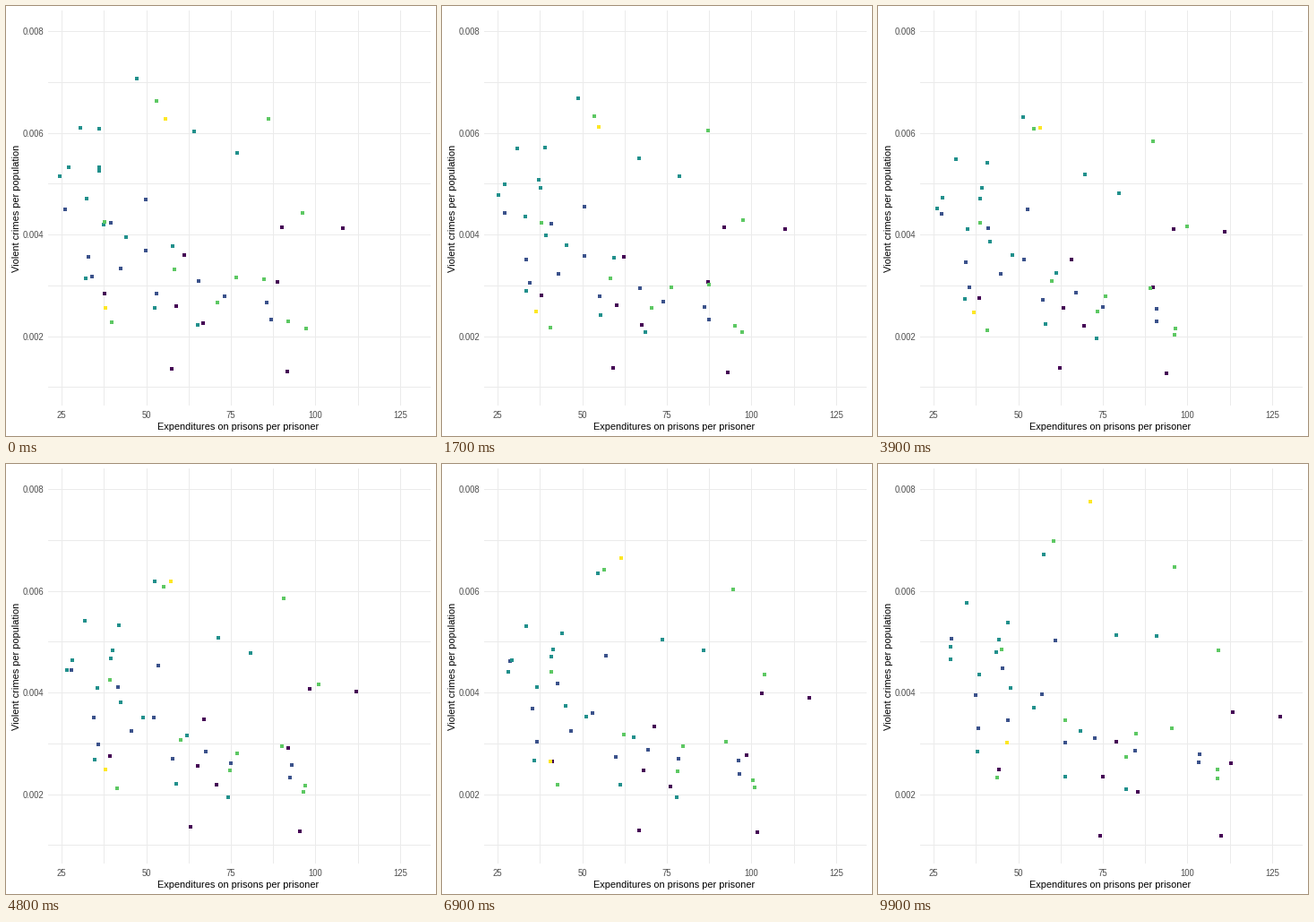
These frames come from a looping animation (480 px wide and 480 px high, 10 s). A matplotlib script:

```python
import numpy as np
import matplotlib.pyplot as plt
from matplotlib.animation import FuncAnimation

FRAMES, STEP, YEARS = 100, 11, 10
MID = 48 / STEP  # the year in which every dot is at its home place
PX = 72 / 80  # points per pixel
ZERO = np.array([-32, 482])  # pixel where both quantities are zero

fig = plt.figure(figsize=(6, 6), dpi=80, facecolor="white")
ax = fig.add_axes((0, 0, 1, 1))
ax.set_xlim(0, 480)
ax.set_ylim(480, 0)
ax.axis("off")


def label(x, y, text, size, color="black", ha="center", angle=0):
    ax.text(x, y, text, size=size * PX, color=color, ha=ha, va="baseline",
            rotation=angle, rotation_mode="anchor", family="Liberation Sans")


def draw_axes():
    grid = dict(color="#EBEBEB", lw=PX, snap=False,
                solid_capstyle="butt", zorder=1)
    for i in range(9):
        x = round(62.2 + 47.2 * i)
        ax.plot([x + .5] * 2, [5, 446], **grid)
        if i % 2 == 0:
            label(x, 460, f"{25 + 12.5 * i:.0f}", 9.5, "#4D4D4D")
    for i in range(8):
        y = round(28.1 + 56.75 * i)
        ax.plot([47, 474], [y + .5] * 2, **grid)
        if i % 2 == 0:
            label(42.5, y + 4, f"{.008 - .001 * i:.3f}", 9.5, "#4D4D4D", "right")
    label(259.5, 473, "Expenditures on prisons per prisoner", 11)
    label(15, 225.5, "Violent crimes per population", 11, angle=90)


rng = np.random.default_rng(5)
paths, colors = [], []


def region(color, trend, bend, homes):
    """Scale the home places year by year: shared curve plus a small walk."""
    homes = np.array(homes) - ZERO
    u = ((np.arange(YEARS) - MID) / (YEARS - 1 - MID))[:, None]
    growth = 1 + np.array(trend) * u + np.array(bend) * u ** 2
    walk = rng.normal(0, .012, (len(homes), YEARS, 2)).cumsum(axis=1)
    walk -= walk[:, 4:6].mean(axis=1, keepdims=True)
    paths.append(ZERO + homes[:, None] * (growth + walk))
    colors.extend([color] * len(homes))


# Trend and bend are shares of (spending, crime rate).
region("#440154", (.12, -.055), (.05, -.03), [
    (339, 251), (390, 254), (315, 317), (221, 285), (116, 326),
    (213, 337), (235, 358), (206, 405), (328, 410)])
region("#3B528B", (.08, .03), (.02, .075), [
    (73, 230), (171, 224), (125, 249), (164, 283), (98, 283), (103, 313),
    (140, 298), (186, 329), (223, 321), (251, 334), (319, 336), (317, 350)])
region("#21908C", (.095, -.055), (0, .105), [
    (88, 175), (126, 181), (119, 209), (165, 131), (237, 194), (273, 211),
    (117, 217), (74, 219), (102, 250), (68, 231), (128, 267), (153, 284),
    (99, 330), (202, 304), (190, 357), (248, 372)])
region("#5DC863", (.065, .02), (.03, .11), [
    (176, 137), (311, 150), (348, 246), (116, 241), (195, 308), (124, 362),
    (258, 322), (250, 343), (308, 315), (332, 366), (333, 359)])
region("#FDE725", (.135, .08), (.12, .13), [(183, 131), (111, 341)])
paths = np.concatenate(paths)


def positions(frame):
    year = min(frame // STEP, YEARS - 2)
    part = frame / STEP - year
    return np.round(paths[:, year] * (1 - part) + paths[:, year + 1] * part)


draw_axes()
dots = ax.scatter(*positions(0).T, s=(4 * PX) ** 2, c=colors,
                  linewidths=0, antialiased=False, zorder=2)


def update(frame):
    dots.set_offsets(positions(frame))
    return dots,


anim = FuncAnimation(fig, update, frames=FRAMES, interval=100,
                     repeat=True, repeat_delay=0)
plt.show()
```
